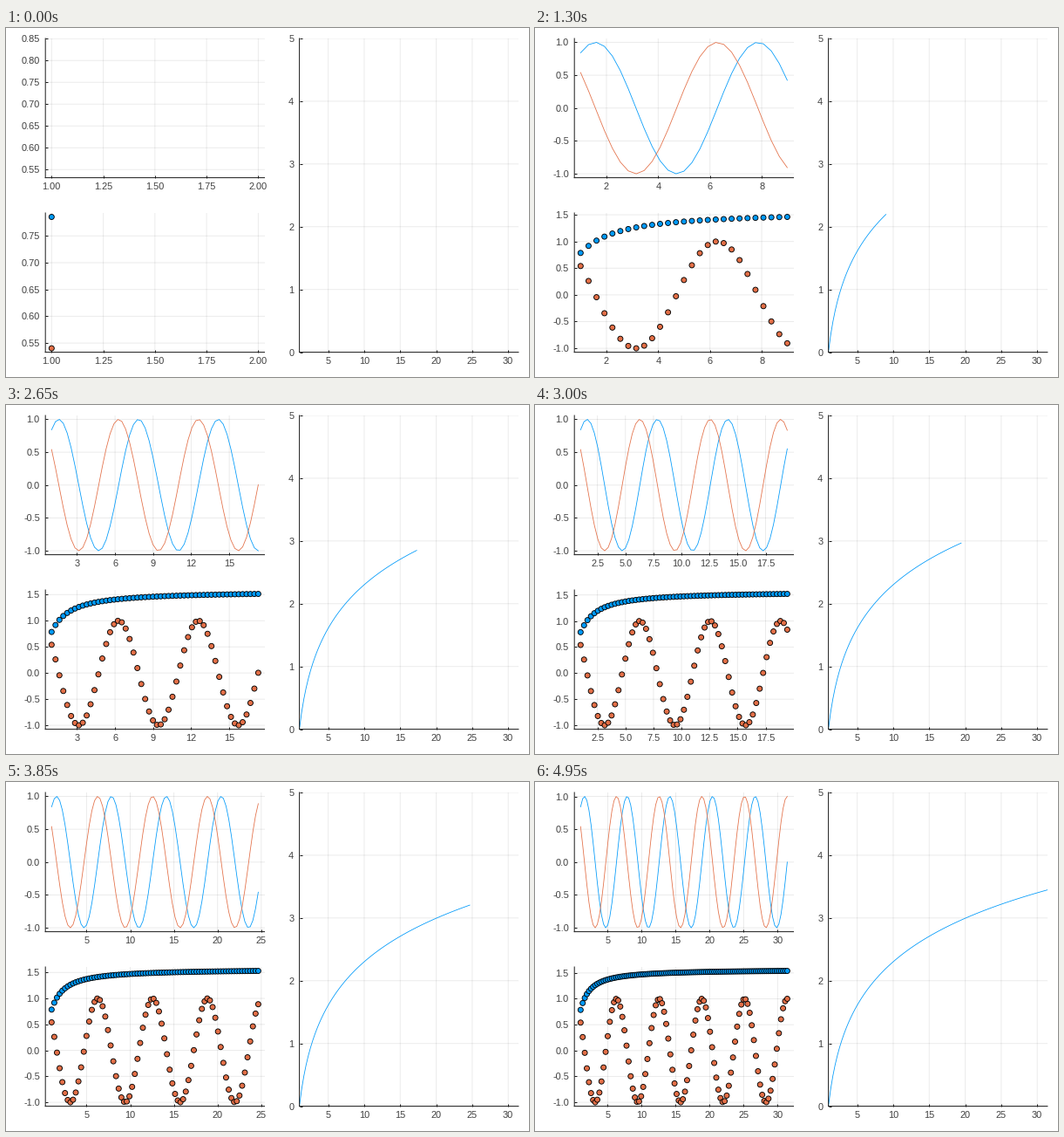
Write a matplotlib script that moves like this. It is 600 px wide and 400 px high and loops after 5000 ms.

```python
import math

import matplotlib.pyplot as plt
import numpy as np
from matplotlib.animation import FuncAnimation

W, H, DPI = 600, 400, 100
PX = 72 / DPI  # points per pixel
FRAMES, INTERVAL = 100, 50
BLUE, ORANGE = "#009afa", "#e36f47"
INK, AXIS = "#404040", "#1c1c1c"
STEPS = [(1, 1.0), (5, 0.9), (2, 0.7), (2.5, 0.5), (3, 0.2)]
MIN_TICKS, MAX_TICKS, IDEAL_TICKS = 4, 8, 5

plt.rcParams["font.family"] = "Liberation Sans"
plt.rcParams["path.snap"] = False  # keep lines at sub-pixel places

xs = np.linspace(1, 10 * math.pi, FRAMES)


def nice_ticks(lo, hi):
    """Pick tick places by granularity, simplicity, coverage and niceness."""
    span = hi - lo
    z = math.ceil(math.log10(span))
    best, best_score = [], -math.inf
    while 2 * MAX_TICKS * 10.0 ** (z + 1) > span:
        for k in range(MIN_TICKS, 2 * MAX_TICKS + 1):
            for q, nice in STEPS:
                step = q * 10.0 ** z
                full = (k - 1) * step
                if full < span:
                    continue
                first = math.ceil((hi - full) / step)
                for r in range(first, math.floor(lo / step) + 1):
                    start = max(r, math.ceil(lo / step))
                    stop = min(r + k - 1, math.floor(hi / step))
                    n = stop - start + 1
                    if not MIN_TICKS <= n <= MAX_TICKS:
                        continue
                    grain = 1 - abs(n - IDEAL_TICKS) / IDEAL_TICKS
                    zero = float(r <= 0 and -r < k)
                    cover = 1.5 * span / ((n - 1) * step)
                    score = grain / 4 + zero / 6 + cover / 3 + nice / 4
                    if full >= 2 * span:
                        score -= 1000
                    if score > best_score + 1e-9:
                        best_score = score
                        best = [i * step for i in range(start, stop + 1)]
        z -= 1
    return best


def labels(ticks):
    digits = 0
    while any(abs(round(t, digits) - t) > 1e-9 for t in ticks):
        digits += 1
    return [f"{t:.{digits}f}" for t in ticks]


def widen(lo, hi):
    if lo == hi:
        hi = lo + 1
    pad = 0.03 * (hi - lo)
    return lo - pad, hi + pad


def set_axes(ax, xlim, ylim):
    ax.set_xlim(xlim)
    ax.set_ylim(ylim)
    xt, yt = nice_ticks(*xlim), nice_ticks(*ylim)
    ax.set_xticks(xt, labels(xt))
    ax.set_yticks(yt, labels(yt))


def panel(left, top, right, bottom):
    ax = fig.add_axes([left / W, 1 - bottom / H,
                       (right - left) / W, (bottom - top) / H])
    ax.set_axisbelow(True)
    ax.grid(color="black", alpha=0.08, linewidth=PX)
    for side in ("top", "right"):
        ax.spines[side].set_visible(False)
    for side in ("left", "bottom"):
        ax.spines[side].set(color=AXIS, linewidth=PX)
    ax.tick_params(direction="in", length=3 * PX, width=PX, color=AXIS,
                   labelcolor=INK, labelsize=11 * PX)
    ax.tick_params(axis="x", pad=5.3 * PX)
    ax.tick_params(axis="y", pad=6.3 * PX)
    return ax


def line(ax, color):
    artist, = ax.plot([], [], color=color, linewidth=0.8 * PX)
    return artist.set_data, artist


def dots(ax, color):
    artist = ax.scatter([], [], color=color, edgecolor="black",
                        linewidth=0.9 * PX)
    artist.set_sizes(np.full(FRAMES, (6 * PX) ** 2))
    return lambda x, y: artist.set_offsets(np.column_stack([x, y])), artist


fig = plt.figure(figsize=(W / DPI, H / DPI), dpi=DPI, facecolor="white")
waves = panel(45.2, 12, 296.5, 171.6)
points = panel(45.2, 212, 296.5, 371.6)
growth = panel(336.6, 12, 587.9, 371.6)

# Each entry: axes, function, (setter, artist)
series = [
    (waves, np.sin, line(waves, BLUE)),
    (waves, np.cos, line(waves, ORANGE)),
    (points, np.arctan, dots(points, BLUE)),
    (points, np.cos, dots(points, ORANGE)),
    (growth, np.log, line(growth, BLUE)),
]
set_axes(growth, (1, 10 * math.pi), (0, 5))
growth.set_xticks(range(5, 31, 5))
growth.set_yticks(range(6))


def update(frame):
    x = xs[:frame + 1]
    for _, func, (set_points, _) in series:
        set_points(x, func(x))
    for ax in (waves, points):
        ys = np.concatenate([f(x) for a, f, _ in series if a is ax])
        set_axes(ax, widen(x[0], x[-1]), widen(ys.min(), ys.max()))
    return [artist for _, _, (_, artist) in series]


anim = FuncAnimation(fig, update, frames=FRAMES, interval=INTERVAL,
                     init_func=lambda: update(0), repeat=True, blit=False)
plt.show()
```
